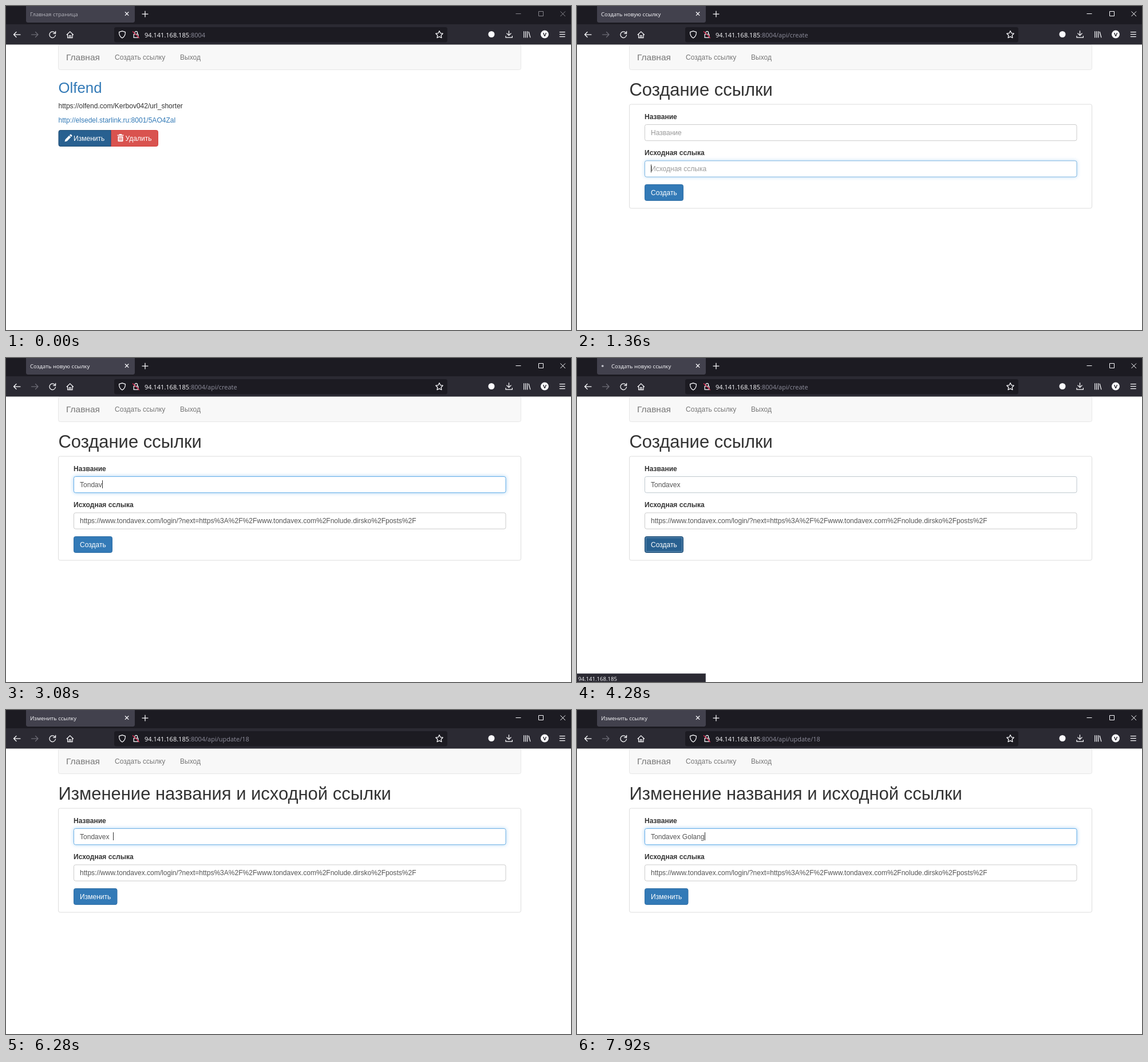
Animation, 987 px wide and 567 px high, one loop 8 s. Source, as an HTML page:

```html
<!DOCTYPE html>
<html lang="ru">
<head>
<meta charset="utf-8">
<title>Сокращение ссылок</title>
<style>
  html, body { margin: 0; width: 100%; height: 100%; overflow: hidden; background: #fff; }
  svg { display: block; width: 987px; height: 567px; }
  text { font: 12.04px "Liberation Sans", Arial, sans-serif; fill: #333; white-space: pre; }
  .ui { font: 9.6px "Open Sans", "Noto Sans", sans-serif; fill: #fbfbfe; }
  .address { font-size: 11px; }
  .h1 { font-size: 30.96px; }
  .h2 { font-size: 25.8px; }
  .brand { font-size: 15.48px; }
  .nav { fill: #777; }
  .link { fill: #337ab7; }
  .label { font-weight: bold; }
  .value { fill: #555; }
  .hint { fill: #999; }
  .on { fill: #fff; }
  .icon { fill: none; stroke: #fbfbfe; stroke-width: 1.25; stroke-linecap: round; stroke-linejoin: round; }
  .thin { fill: none; stroke-width: 1; }
</style>
</head>
<body>
<svg id="stage" viewBox="0 0 987 567"></svg>
<script>
const LOOP = 8000, STEP = 40;
const HOST = "94.141.168.185";
const NAME = "Tondavex";
const LONG_URL = "https://www.tondavex.com/login/?next=https%3A%2F%2Fwww.tondavex.com%2Fnolude.dirsko%2Fposts%2F";
const WAITING = "Ожидание ответа от ff.kis.v2.scr.kaspersky-labs.com...";

// Page loads: click, address change, first paint, end, reload button back
const LOADS = [
  { start: 600, commit: 720, paint: 960, end: 1080, ready: 1320 },
  { start: 4240, commit: 4440, paint: 4600, end: 4880, ready: 5080 },
  { start: 5480, commit: 5600, paint: 5760, end: 5960, ready: 6200 }
];
const PAGES = [
  { title: "Главная страница", path: "" },
  { title: "Создать новую ссылку", path: "/api/create", heading: "Создание ссылки", button: "Создать", width: 67 },
  { title: "Главная страница", path: "" },
  { title: "Изменить ссылку", path: "/api/update/18", heading: "Изменение названия и исходной ссылки", button: "Изменить", width: 75.5 }
];
const NAME_KEYS = [2600, 2640, 2800, 2840, 2880, 3080, 3200, 3320];
const EDITS = [[6240, " "], [6280, "  "], [6760, " "], [7000, " G"], [7040, " Go"], [7080, " Gol"], [7120, " Gola"], [7280, " Golang"]];
const NAME_CARET = [[1960, 2440], [2600, 3760], [6200, 6600], [6760, 7480], [7920, 8000]];
const URL_CARET = [[1280, 1960]];
const NAME_FOCUS = [[1960, 4160], [6160, 9000]];
const URL_FOCUS = [[1260, 1960]];

const text = (x, y, cls, str, id = "") => `<text x="${x}" y="${y}" class="${cls}" id="${id}">${str}</text>`;
const box = (x, y, w, h, fill, extra = "") => `<rect x="${x}" y="${y}" width="${w}" height="${h}" fill="${fill}" ${extra}/>`;
const icon = (d, extra = "") => `<path class="icon" d="${d}" ${extra}/>`;
const group = (id, body, extra = "") => `<g id="${id}" ${extra}>${body}</g>`;

const browser = () =>
  box(0, 0, 987, 32, "#1c1b22") + box(0, 32, 987, 35.5, "#2b2a33") +
  box(35, -4, 190, 33, "#42414d", 'rx="3.4"') +
  text(42, 18, "ui", "", "title") +
  `<ellipse id="dot" cy="14" ry="1.7"/>` +
  icon("M208.3 10.8l5.6 5.6m0-5.6l-5.6 5.6", 'stroke-width="1"') +
  icon("M238 14h10M243 9v10") +
  group("controls", `<path class="thin" d="M890.5 13.5h9M930.5 9.5h8v8h-8zM968.5 9.5l8.5 8.5m0-8.5l-8.5 8.5"/>`) +
  icon("M25 50H13.5m4.5-4.5L13.5 50l4.5 4.5") +
  icon("M44.5 50H56m-4.5-4.5L56 50l-4.5 4.5", 'style="stroke:#6d6c76"') +
  group("reload", icon("M85.6 47.2a5.3 5.3 0 1 0 .9 3.6M86.6 44.3v3.9h-4")) +
  group("stop", icon("M77 45.8l8.6 8.6m0-8.6l-8.6 8.6")) +
  icon("M106.2 50.3l5.6-5.4 5.6 5.4M107.6 49.5v6.2h8.4v-6.2M110.4 55.5v-3.7h2.8v3.7") +
  box(189, 37, 582, 26.5, "#1c1b22", 'rx="3.4"') +
  icon("M203 43.8l5.4 1.9c.2 4.7-1.6 8.2-5.4 10.3-3.8-2.1-5.6-5.6-5.4-10.3z") +
  icon("M223.2 49.4h7.6v6h-7.6zM224.8 49v-2.2a2.4 2.4 0 0 1 4.8 0v2.2") +
  icon("M221.5 44.8l11 11", 'style="stroke:#e22850"') +
  `<text x="242" y="54.5" class="ui address">${HOST}<tspan id="path" fill="#8f8f9d"></tspan></text>` +
  icon("M757 43.6l1.9 4 4.3.6-3.1 3.1.8 4.4-3.9-2.1-3.9 2.1.8-4.4-3.1-3.1 4.3-.6z") +
  `<circle cx="848" cy="49.5" r="5.5" fill="#fbfbfe"/>` +
  icon("M878.5 43.5v8m-3.6-3.5l3.6 3.6 3.6-3.6M873 52.5v2.7h11.4v-2.7") +
  icon("M904.8 44.5v10.5M907.8 44.5v10.5M910.8 44.5v10.5M913.2 45.3l2.6 9.5") +
  box(927, 36, 28, 28, "#52525e", 'rx="3" id="accountHover"') +
  `<circle cx="941" cy="49.6" r="7" fill="#fbfbfe"/>` +
  text(938, 53, "ui", "V").replace('class="ui"', 'class="ui" style="fill:#1c1b22;font-weight:bold"') +
  icon("M967.3 45.5h9M967.3 49.5h9M967.3 53.5h9");

const navbar = () =>
  box(91.5, 67.5, 808, 44, "#f8f8f8", 'stroke="#e7e7e7" rx="3"') +
  text(105, 94.8, "brand nav", "Главная") +
  text(190, 93.6, "nav", "Создать ссылку", "createLink") +
  text(304, 93.6, "nav", "Выход") +
  box(178.5, 69.5, 111, 40, "none", 'stroke="#888" stroke-dasharray="1 1" id="linkFocus"');

const pencil = `<path fill="#fff" d="M102.5 237.5l1.1-4.1 6.6-6.6 3 3-6.6 6.6zM111 226l1.2-1.2q.8-.6 1.5 0l1.5 1.5q.6.8 0 1.5L114 229z"/>`;
const trash = `<path fill="#fff" d="M194.5 225.5h3.3v-1.6h4.4v1.6h3.3v1.6h-11zM195.5 228h9v8.2q0 1-1 1h-7q-1 0-1-1z"/>` +
  `<path class="thin" stroke="#d9534f" d="M198 229.5v6M200 229.5v6M202 229.5v6"/>`;

// A button with its left or right corners rounded
const halfButton = (x, w, side, fill, stroke, id) => {
  const r = 3, far = x + side * w;
  return `<path id="${id}" fill="${fill}" stroke="${stroke}" d="M${x} 217.5H${far - side * r}Q${far} 217.5 ${far} ${217.5 + r}V${245.5 - r}Q${far} 245.5 ${far - side * r} 245.5H${x}z"/>`;
};

const entry = (id, dy, name, url, short) => group(id,
  text(91.5, 152, "h2 link", name) +
  box(92, 154, 75, 1.6, "#23527c", `id="${id}Line"`) +
  text(91.5, 178.6, "", url) +
  text(91.5, 204, "link", "http://elsedel.starlink.ru:8001/" + short) +
  halfButton(183, 82.5, 1, "#d9534f", "#d43f3a", "") +
  halfButton(183, 91, -1, "#286090", "#204d74", id + "Edit") +
  pencil + trash +
  text(118, 235.7, "on", "Изменить") + text(208.5, 235.7, "on", "Удалить"),
  `transform="translate(0 ${dy})"`);

const field = (id, y, label) =>
  text(118, y - 9.2, "label", label) +
  box(118, y, 755.5, 29, "#66afe9", `rx="4" filter="url(#blur)" id="${id}Glow"`) +
  box(118.5, y + .5, 754.5, 28.2, "#fff", `rx="3" id="${id}Box"`) +
  text(129, y + 18.6, "value", "", id) +
  box(0, y + 7, 1, 14, "#333", `id="${id}Caret"`);

const form = () => group("form",
  text(91.5, 156.8, "h1", "", "heading") +
  box(91.5, 172, 808, 182, "#fff", 'stroke="#ddd" rx="3"') +
  field("name", 207, "Название") +
  field("url", 270.4, "Исходная сслыка") +
  box(118.5, 312.5, 67, 28, "#337ab7", 'rx="3" id="submit"') +
  box(120.5, 314.5, 63, 24, "none", 'stroke="#9db8cf" stroke-dasharray="1 1" id="submitFocus"') +
  text(129, 330.8, "on", "", "submitText"));

document.getElementById("stage").innerHTML =
  `<defs><filter id="blur" x="-5%" y="-80%" width="110%" height="260%"><feGaussianBlur stdDeviation="3.4"/></filter></defs>` +
  box(0, 0, 987, 567, "#fff") + navbar() +
  group("list",
    entry("first", 0, "Olfend", "https://olfend.com/Kerbov042/url_shorter", "5AO4Zal") +
    entry("second", 134.8, NAME, LONG_URL, "8PYG7W3")) +
  form() + browser() +
  group("status", box(-.5, 552.5, 10, 20, "#2b2a33", 'stroke="#52525e" id="statusBox"') + text(2, 565.3, "ui", "", "statusText"));

const el = {};
document.querySelectorAll("#stage [id]").forEach(node => { if (node.id) el[node.id] = node; });

const show = (id, on) => el[id].setAttribute("visibility", on ? "inherit" : "hidden");
const set = (id, attrs) => { for (const key in attrs) el[id].setAttribute(key, attrs[key]); };
const write = (id, str) => { if (el[id].textContent !== str) el[id].textContent = str; };
const within = (t, spans) => spans.some(([a, b]) => t >= a && t < b);
const passed = (t, key) => LOADS.filter(load => t >= load[key]).length;
const ease = p => { p = Math.min(1, Math.max(0, p)); return p * p * (3 - 2 * p); };
const mix = (a, b, p) => `rgb(${a.map((v, i) => Math.round(v + (b[i] - v) * p))})`;
const focusLevel = (t, spans) => Math.max(...spans.map(([a, b]) => ease((t - a) / 150) - ease((t - b) / 150)));

function drawField(id, t, value, hint, focus, caret) {
  const level = focusLevel(t, focus);
  set(id + "Glow", { opacity: .6 * level });
  set(id + "Box", { stroke: mix([204, 204, 204], [102, 175, 233], level) });
  write(id, value || hint);
  set(id, { class: value ? "value" : "hint" });
  const end = value ? el[id].getComputedTextLength() : 0;
  set(id + "Caret", { x: Math.round(129 + end) });
  show(id + "Caret", within(t, caret));
}

function drawForm(t, page, editing) {
  write("heading", page.heading);
  write("submitText", page.button);
  const hover = !editing && t >= 3960, pressed = !editing && t >= 4200;
  set("submit", { width: page.width, fill: hover ? "#286090" : "#337ab7", stroke: hover ? "#204d74" : "#2e6da4" });
  show("submitFocus", pressed);
  const typed = NAME.slice(0, NAME_KEYS.filter(k => t >= k).length);
  const edit = EDITS.filter(([k]) => t >= k).pop();
  drawField("name", t, editing ? NAME + (edit ? edit[1] : "") : typed, "Название", NAME_FOCUS, NAME_CARET);
  drawField("url", t, editing || t >= 1720 ? LONG_URL : "", "Исходная сслыка", URL_FOCUS, URL_CARET);
}

function drawStatus(t, load) {
  let label = "", width = 167;
  if (load) {
    label = t < load.commit ? HOST : WAITING;
    width = t < load.commit ? 225 : 251;
  } else if (t >= 560 && t < 600) {
    label = HOST + ":8004/api/create";
    width = 151;
  } else if (t >= 5080 && t < 5480) {
    label = HOST + ":8004/api/update/18";
  }
  show("status", label);
  write("statusText", label);
  set("statusBox", { width });
}

function drawTab(t, load) {
  const page = PAGES[passed(t, "commit")];
  const active = t >= 560;
  write("title", page.title);
  set("title", { x: load ? 60 : 42, style: `fill:${active ? "#fbfbfe" : "#b5b5bd"}` });
  write("path", ":8004" + page.path);
  set("controls", { stroke: active ? "#fbfbfe" : "#86858c" });
  show("dot", load);
  if (load) {
    const connected = t >= load.commit;
    const phase = connected ? (t - load.commit) / 300 : (t - load.start) / 500;
    const swing = Math.PI * 2 * phase;
    set("dot", {
      cx: 49.5 - 5.5 * Math.cos(swing),
      rx: 1.7 + (connected ? 1.4 : .6) * Math.abs(Math.sin(swing)),
      fill: connected ? "#0a84ff" : "#c4c4cc"
    });
  }
  const stopping = LOADS.some(l => t >= l.commit && t < l.ready);
  show("stop", stopping);
  show("reload", !stopping);
}

function draw(t) {
  const load = LOADS.find(l => t >= l.start && t < l.end);
  const index = passed(t, "paint"), page = PAGES[index];
  drawTab(t, load);
  drawStatus(t, load);
  show("accountHover", t >= 80 && t < 120);
  show("firstLine", t >= 280 && t < 320);
  show("secondLine", false);
  set("createLink", { style: `fill:${t >= 400 && index === 0 ? "#333" : "#777"}` });
  show("linkFocus", t >= 600 && index === 0);

  const hasForm = Boolean(page.heading);
  show("form", hasForm);
  show("list", !hasForm);
  show("second", index === 2);
  const editHover = t >= 5080;
  set("secondEdit", { fill: editHover ? "#204d74" : "#286090", stroke: editHover ? "#122b40" : "#204d74" });
  if (hasForm) drawForm(t, page, index === 3);
}

function tick() {
  const t = performance.now() % LOOP;
  draw(Math.floor(t / STEP) * STEP);
  requestAnimationFrame(tick);
}
tick();
</script>
</body>
</html>
```
